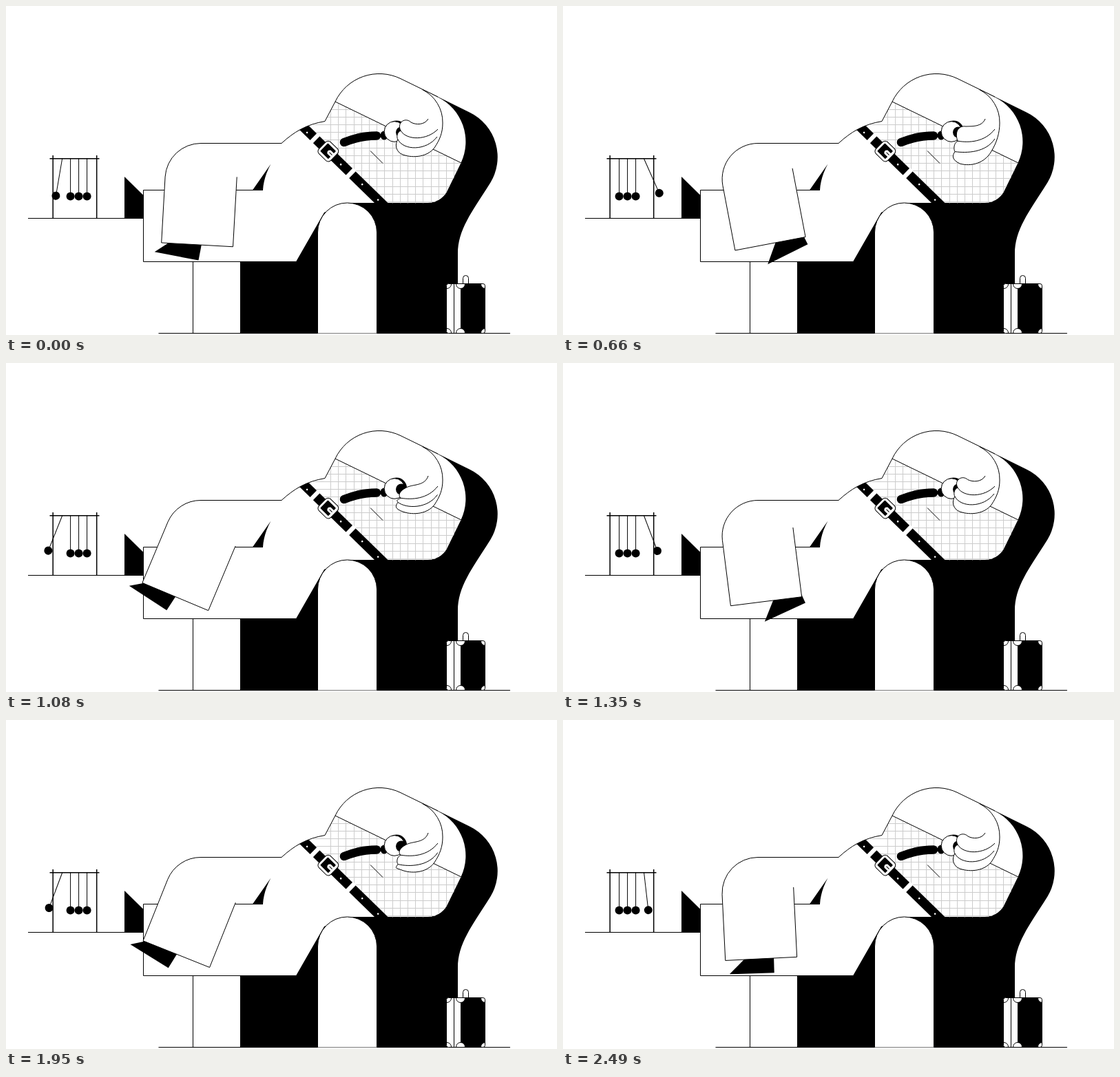
Animation of 800x478 px, one loop 2520 ms. Source, as an HTML page:

```html
<!DOCTYPE html>
<html lang="en">
<head>
<meta charset="utf-8">
<title>Nap with a cradle</title>
<style>
  html, body { margin: 0; width: 100%; height: 100%; overflow: hidden; background: #fff; }
  svg { display: block; width: 100%; height: 100%; }
  .line { fill: none; stroke: #000; }
  .skin { fill: #fff; stroke: #000; }
  .bold { fill: none; stroke: #000; stroke-width: 1.5; }
</style>
</head>
<body>
<svg viewBox="0 0 800 478">
  <defs>
    <clipPath id="shirt">
      <path d="M478 139L661 228L640 270A32 32 0 0 1 611 286.500H554L441 175L463 167.500Z"/>
    </clipPath>
    <clipPath id="torso">
      <path d="M400 199.500C418 183 436 172 463 167.500L600 190V286.500H470Z"/>
    </clipPath>
    <clipPath id="case"><rect x="639.500" y="403.500" width="56" height="72" rx="3"/></clipPath>
  </defs>

  <!-- floor and table -->
  <path d="M271 477H695" stroke="#e6e6e6"/>
  <path class="line" d="M221.500 475.500H732M32 308.500H199"/>

  <!-- cradle -->
  <path class="bold" d="M68.200 217V308M131.700 217V308M63.500 221.700H135.500"/>
  <g id="cradle"></g>

  <!-- footstool and resting foot -->
  <path d="M172 248L199.500 275V308.500H172Z"/>
  <path class="line" d="M373 267.500H199.500V371.500H421M271.500 371.500V475"/>

  <!-- swinging leg -->
  <path id="shoe" d="M-45 122H20V60Z"/>
  <path id="leg" class="skin"/>
  <path d="M384.500 229.500L358 267.500H373Q374 249 384.500 229.500Z"/>

  <!-- chair -->
  <path d="M605 121L673 154.500A72 72 0 0 1 702.500 258C676 300 656 325 656 360V475.500H340V371.500H421L462 300L495 286H611A32 32 0 0 0 640 270L660.500 228A72 72 0 0 0 627 132.500Z"/>
  <path class="skin" d="M452.500 475.500V329A43 43 0 0 1 538.500 329V475.500"/>

  <!-- shirt, belt, shoulder -->
  <g id="check" clip-path="url(#shirt)" stroke="#ccc" shape-rendering="crispEdges"></g>
  <path class="line" d="M400 199.500C418 183 436 172 463 167.500L478 139A70.800 70.800 0 0 1 573 105.600L627 132M478 139L661 228M529 210.500L547 228.500"/>
  <g clip-path="url(#torso)">
    <g transform="translate(433.500 177.500) rotate(44.300)">
      <path d="M-15 -6.800H180V6.800H-15Z"/>
      <path fill="#fff" d="M18 -8H24V8H18ZM90.500 -8H97V8H90.500Z"/>
      <g fill="#fff">
        <circle cx="7" cy="2" r="1.300"/><circle cx="74.500" cy="1" r="1.300"/>
        <circle cx="117" cy="0" r="1.300"/><circle cx="149" cy="0" r="1.300"/>
      </g>
      <rect class="skin" x="36" y="-12" width="24" height="24" rx="5"/>
      <rect x="39.500" y="-8" width="16.500" height="16" rx="1"/>
      <path d="M57 -2H50Q47.500 0 50 2H57" fill="none" stroke="#fff" stroke-width="3"/>
    </g>
  </g>

  <!-- face -->
  <path d="M491 198Q514 188.500 538 188.500" fill="none" stroke="#000" stroke-width="12.500" stroke-linecap="round"/>
  <ellipse cx="549" cy="188" rx="5.500" ry="6.500"/>
  <circle cx="567" cy="181.500" r="15"/>
  <circle class="skin" cx="564" cy="182.500" r="14.800"/>
  <circle cx="574" cy="183.500" r="8"/>

  <!-- arm and fingers -->
  <path id="hand" class="skin"/>
  <path id="folds" class="line"/>
  <path class="line" d="M604.500 121.500A53 53 0 0 1 634 170"/>

  <!-- suitcase -->
  <path class="skin" d="M663.500 404V395.500A4 4 0 0 1 671.500 395.500V404"/>
  <g clip-path="url(#case)">
    <path fill="#fff" d="M639 403H660V476H639Z"/>
    <path d="M660 403H696V476H660Z"/>
    <path class="line" d="M650.500 404V475"/>
    <g id="corners"></g>
  </g>
  <rect class="line" x="639.500" y="403.500" width="56" height="72" rx="3"/>
</svg>
<script>
const NS = 'http://www.w3.org/2000/svg';
const STEP = 30, CYCLE = 840, HALF = CYCLE / 2;
const KNEE = { x: 283, y: 251 };
const RAD = Math.PI / 180;
const byId = id => document.getElementById(id);

function add(parent, tag, attrs) {
  const el = parent.appendChild(document.createElementNS(NS, tag));
  for (const k in attrs) el.setAttribute(k, attrs[k]);
  return el;
}

// Monotone cubic through [x, y] points
function curve(pts) {
  const last = pts.length - 1;
  const sec = pts.slice(1).map((p, i) => (p[1] - pts[i][1]) / (p[0] - pts[i][0]));
  const slope = pts.map((p, i) => {
    if (i === 0) return sec[0];
    if (i === last) return sec[last - 1];
    const a = sec[i - 1], b = sec[i];
    return a * b > 0 ? 2 * a * b / (a + b) : 0;
  });
  return x => {
    let i = 0;
    while (i < last - 1 && x > pts[i + 1][0]) i++;
    const [x0, y0] = pts[i], [x1, y1] = pts[i + 1];
    const h = x1 - x0, s = (x - x0) / h, r = 1 - s;
    return y0 * (1 + 2 * s) * r * r + y1 * s * s * (3 - 2 * s)
      + h * s * r * (slope[i] * r - slope[i + 1] * s);
  };
}

const legEase = curve([[0, 0], [.071, .006], [.143, .035], [.4286, .241], [.5, .418], [.714, .888], [.88, .985], [1, 1]]);
const shoeEase = curve([[0, 0], [.071, .008], [.143, .028], [.4286, .417], [.5, .627], [.714, .96], [1, 1]]);
const ballArc = curve([[0, .44], [.214, .86], [.5, 1], [.571, .99], [.643, .93], [.929, .27], [1, 0]]);

// Back and forth between lo and hi, turning at the quarter points
function swing(t, lo, hi, ease) {
  const p = (t + HALF / 2) % CYCLE / HALF;
  const k = p < 1 ? ease(p) : 1 - ease(p - 1);
  return lo + (hi - lo) * k;
}

// Two smooth taps per cycle
function tap(t, first, second, width) {
  return Math.max(...[first, second].map(c => {
    const d = Math.abs(t - c) / width;
    return d < 1 ? (1 + Math.cos(Math.PI * d)) / 2 : 0;
  }));
}

for (let i = 0; i < 18; i++) {
  const x = 471.5 + 11.2 * i, y = 150 + 11.2 * i;
  add(byId('check'), 'path', { d: `M${x} 130V290M440 ${y}H670` });
}

const balls = [0, 1, 2, 3].map(i => {
  const g = add(byId('cradle'), 'g', { transform: `translate(${81.600 + 12 * i} 222)` });
  const arm = add(g, 'g', {});
  add(arm, 'path', { d: 'M0 0V54', class: 'line' });
  add(arm, 'circle', { cy: 54.500, r: 6 });
  return arm;
});

for (const x of [640, 660, 696])
  for (const y of [404, 475]) add(byId('corners'), 'circle', { cx: x, cy: y, r: 6.500, class: 'skin' });

function drawLeg(t) {
  const a = swing(t, -11, 23, legEase) * RAD;
  const at = (x, y) => [
    KNEE.x + x * Math.cos(a) - y * Math.sin(a),
    KNEE.y + x * Math.sin(a) + y * Math.cos(a)
  ].map(v => v.toFixed(2)).join(' ');
  byId('leg').setAttribute('d',
    `M400 199.500H283A52 52 0 0 0 ${at(-52, 0)}L${at(-52, 96)}L${at(52, 96)}L${at(52, -5.5)}`);
  const s = swing(t, -27, 33.5, shoeEase);
  byId('shoe').setAttribute('transform', `translate(${KNEE.x} ${KNEE.y - 5}) rotate(${s})`);
}

function drawCradle(t) {
  const right = t >= HALF;
  const k = ballArc(t % HALF / HALF);
  balls[0].setAttribute('transform', `rotate(${right ? 0 : 22 * k})`);
  balls[3].setAttribute('transform', `rotate(${right ? -24.2 * k : 0})`);
}

function drawHand(t) {
  const tip = tap(t, 255, 605, 110), a = tap(t, 255, 645, 105);
  const b = tap(t, 295, 650, 105), c = tap(t, 330, 660, 85);
  const mix = (up, down) => up.map((v, i) => (v + (down[i] - v) * tip).toFixed(2)).join(' ');
  const y2 = 181 + 16 * a, y3 = 194 + 18 * b;
  const index = mix(
    [608, 173, 595, 173, 588, 169, 580, 161, 567, 169],
    [608, 179, 592, 176, 582, 181, 573, 186, 568, 192]);
  byId('hand').setAttribute('d', `M613 164C${index} 573 ${y2}`
    + `C567 ${y2 + 3} 567 ${y3 - 3} 569 ${y3}`
    + `C564 ${y3 + 7} 566 ${212 + 12 * c} 576 ${216 + 13 * c}`
    + `C592 ${221.500 + 12 * c} 612 ${219 + 10 * c} 622 ${206 + 5 * c}`
    + `C630 ${194 + 4 * c} 634 184 634 170`);
  byId('folds').setAttribute('d',
    `M573 ${y2}C${582 + 8 * a} ${196 + 3 * a} 612 ${195 + 3 * a} 627 179`
    + `M569 ${y3}C${577 + 10 * b} ${210 + 4 * b} ${610 + 4 * b} ${211 + 2 * b} ${626 + b} ${190 + 3 * b}`);
}

const start = performance.now();

function tick() {
  const t = Math.floor((performance.now() - start) / STEP) * STEP % CYCLE;
  drawLeg(t);
  drawCradle(t);
  drawHand(t);
  requestAnimationFrame(tick);
}

tick();
</script>
</body>
</html>
```
